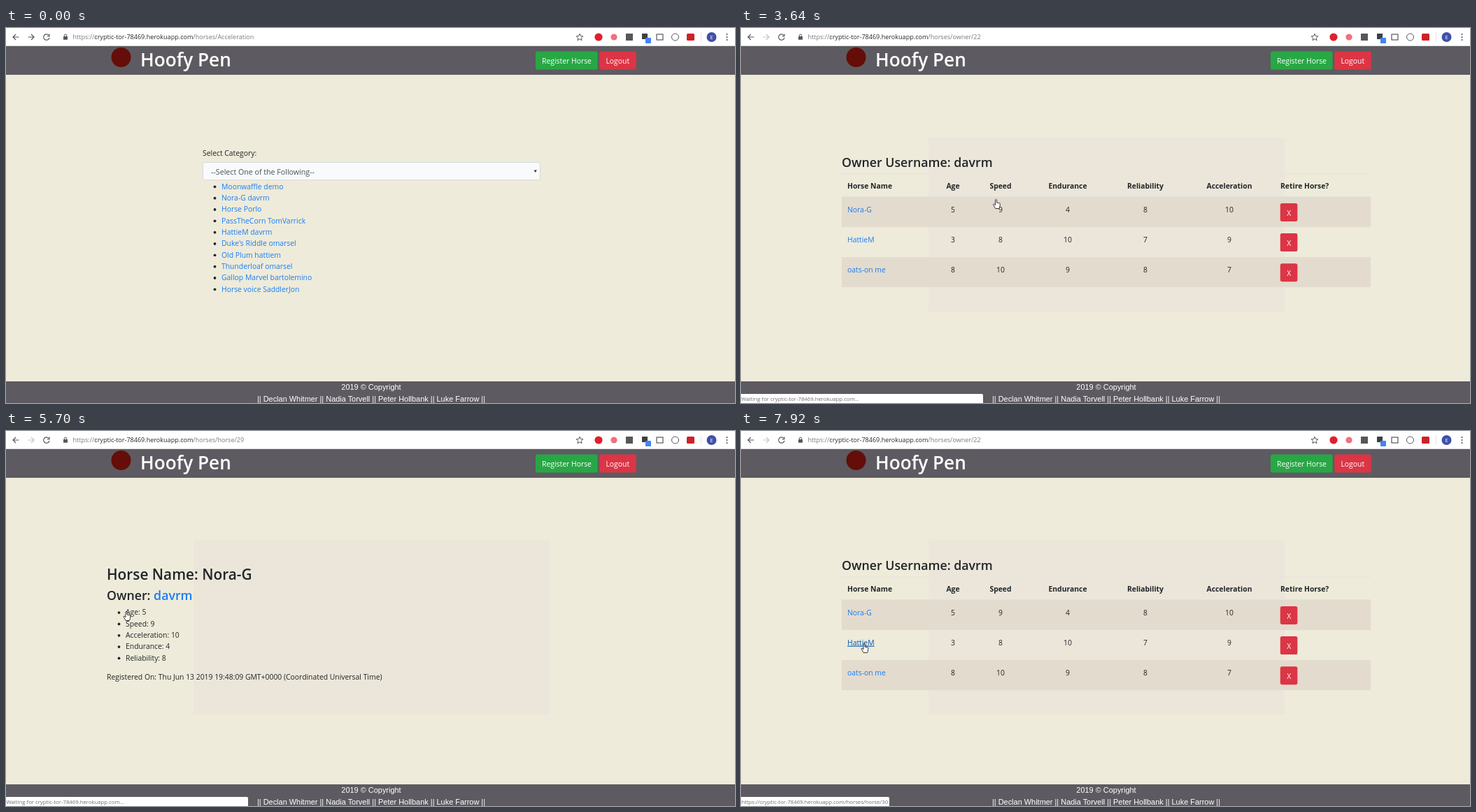
Write an HTML page that moves like this. It is 1042 px wide and 537 px high and loops after 8000 ms.

```html
<!DOCTYPE html>
<html lang="en">
<head>
<meta charset="utf-8">
<title>Horse list</title>
<style>
  html, body { margin: 0; width: 100%; height: 100%; overflow: hidden; background: #eeebda; }
  svg { display: block; }
  text { font: 10.38px "Open Sans", "Noto Sans", sans-serif; fill: #212529; white-space: pre; }
  .mid { text-anchor: middle; }
  .bold { font-weight: 700; }
  .h1 { font-size: 26.2px; font-weight: 600; fill: #fff; }
  .h2 { font-size: 20.8px; font-weight: 600; }
  .h3 { font-size: 17.75px; font-weight: 600; }
  .white { fill: #fff; }
  .field { font-size: 10.65px; fill: #495057; }
  .link { fill: #1a7df5; }
  .link.hot { fill: #0056b3; text-decoration: underline; }
  .foot { font: 10.95px "Liberation Sans", Arial, sans-serif; fill: #fff; text-anchor: middle; }
  .url { font-size: 9.05px; fill: #777a7e; }
  .url .host { fill: #26282b; }
  .status { font-size: 7.75px; fill: #6a6d70; }
  .initial { font-size: 7.5px; }
  .line { fill: none; stroke: #54575b; stroke-width: 1.2; }
  .thin { stroke-width: 1; }
</style>
</head>
<body>
<svg id="stage" width="1042" height="537" viewBox="0 0 1042 537">
  <rect width="1042" height="537" fill="#eeebda"/>

  <!-- browser toolbar -->
  <rect width="1042" height="26" fill="#fff"/>
  <rect y="25" width="1042" height="1" fill="#dcdcde"/>
  <path class="line" d="M18.5 13H10M14 9l-4 4 4 4"/>
  <path id="forward" class="line" d="M31.5 13H40M36 9l4 4-4 4"/>
  <path class="line" data-on="0-3330 3640-5460 5700-7000 7400-8000" d="M61 10.2A4.2 4.2 0 1 0 62 14M62 8.6v3h-3"/>
  <path class="line" data-on="3330-3640 5460-5700 7000-7400" d="M54.5 9.5l7 7M61.5 9.5l-7 7"/>
  <rect x="82" y="12" width="6" height="4.8" rx=".6" fill="#54575b"/>
  <path class="line thin" d="M83.3 12v-1.3a1.7 1.7 0 0 1 3.4 0V12"/>
  <g id="urls"></g>
  <path class="line thin" d="M820 8.2l1.4 3.3 3.5.3-2.7 2.4.8 3.5-3-1.9-3 1.9.8-3.5-2.7-2.4 3.5-.3z"/>
  <circle cx="847" cy="13" r="5.6" fill="#e01f2d"/>
  <circle cx="869" cy="13" r="4.6" fill="#f0707c"/>
  <rect x="886" y="8" width="10" height="10" fill="#55575a"/>
  <rect x="909" y="8" width="8" height="8" fill="#3d4043"/>
  <rect x="914" y="14" width="8" height="8" rx="1" fill="#4285f4"/>
  <rect class="line" x="930" y="9" width="9" height="8"/>
  <circle class="line thin" cx="956.5" cy="13" r="5"/>
  <rect x="973" y="8" width="11" height="10" rx="1.5" fill="#cf2026"/>
  <path d="M993.5 6v14" stroke="#e3e4e6"/>
  <circle cx="1008.5" cy="13" r="7" fill="#3f50a8"/>
  <text class="mid white initial" x="1008.5" y="15.8">E</text>
  <g fill="#54575b"><circle cx="1030.5" cy="9" r="1.1"/><circle cx="1030.5" cy="13" r="1.1"/><circle cx="1030.5" cy="17" r="1.1"/></g>

  <!-- site header and footer -->
  <rect y="26" width="1042" height="41" fill="#5d5b61"/>
  <circle cx="164.5" cy="42" r="14" fill="#650d08"/>
  <text class="h1" x="192" y="54.5">Hoofy Pen</text>
  <rect x="757" y="33.6" width="88.6" height="26" rx="2.7" fill="#28a745"/>
  <text class="mid white" x="801.5" y="51">Register Horse</text>
  <rect x="848.3" y="33.6" width="52.4" height="26" rx="2.7" fill="#dc3545"/>
  <text class="mid white" x="874.3" y="51">Logout</text>
  <rect y="506" width="1042" height="31" fill="#5d5b61"/>
  <text class="foot" x="522" y="518">2019 © Copyright</text>
  <text class="foot" x="522" y="534.5">|| Declan Whitmer || Nadia Torvell || Peter Hollbank || Luke Farrow ||</text>

  <rect data-on="3640-8000" x="268" y="157" width="509" height="249" fill="#ece6da"/>

  <!-- category page -->
  <g data-on="0-3640">
    <text x="281" y="183.3">Select Category:</text>
    <rect x="281.4" y="192.4" width="482" height="25.3" rx="2.7" fill="#f8fafb" stroke="#ced4da" stroke-width=".8"/>
    <text class="field" x="293" y="209.6">--Select One of the Following--</text>
    <path d="M754.5 203.5h4.4l-2.2 3.6z" fill="#333"/>
    <g id="horses"></g>
  </g>

  <!-- owner page -->
  <g id="owner" data-on="3640-5700 7400-8000"></g>

  <!-- horse page -->
  <g data-on="5700-7400">
    <text class="h2" x="144" y="212.8">Horse Name: Nora-G</text>
    <text class="h3" x="144" y="241.5">Owner: <tspan class="link" data-hot="6760-7400">davrm</tspan></text>
    <g id="facts"></g>
    <text x="144" y="356">Registered On: Thu Jun 13 2019 19:48:09 GMT+0000 (Coordinated Universal Time)</text>
  </g>

  <g id="statuses"></g>

  <g id="cursor" data-on="70-8000" stroke="#222" stroke-width=".9" stroke-linejoin="round">
    <path id="arrow" fill="#fff" d="M0 0v9.3l2.2-2 1.5 3.2 1.5-.7-1.5-3.1h2.9z"/>
    <path id="hand" fill="#fff" d="M-1 1Q0-.5 1 1V5l4 .8q1 .3.9 1.4l-.6 4-.9 2.3H-.8L-3.7 8.6q-.6-1.3.6-1.6L-1 8.6z"/>
    <path id="beam" fill="none" d="M-1.7-5H-.5L0-4.5.5-5h1.2M0-4.5v9M-1.7 5H-.5L0 4.5.5 5h1.2"/>
  </g>
</svg>

<script>
const LOOP = 8000, FRAME = 75;
const HOST = "cryptic-tor-78469.herokuapp.com";
const $ = id => document.getElementById(id);
const text = (x, y, body, cls = "") => `<text x="${x}" y="${y}" class="${cls}">${body}</text>`;
const link = (label, hot = "") => `<tspan class="link" data-hot="${hot}">${label}</tspan>`;
const bullets = (items, x, y) => items.map((item, i) => {
  const base = y + i * 16.34;
  return `<circle cx="${x - 9.5}" cy="${base - 3.3}" r="1.9" fill="#212529"/>` + text(x, base, item);
}).join("");

$("urls").innerHTML = [
  ["Acceleration", "0-3460"],
  ["owner/22", "3460-5620 7330-8000"],
  ["horse/29", "5620-7330"]
].map(([path, on]) => `<g data-on="${on}">` +
  text(95.5, 16.2, `https://<tspan class="host">${HOST}</tspan>/horses/${path}`, "url") + "</g>").join("");

$("horses").innerHTML = bullets([
  ["Moonwaffle", "demo"], ["Nora-G", "davrm", "1740-2140", "2290-3640"], ["Horse", "Porlo"],
  ["PassTheCorn", "TomVarrick"], ["HattieM", "davrm"], ["Duke's Riddle", "omarsel"],
  ["Old Plum", "hattiem"], ["Thunderloaf", "omarsel"], ["Gallop Marvel", "bartolemino"],
  ["Horse voice", "SaddlerJon"]
].map(([horse, user, a, b]) => link(horse, a) + " " + link(user, b)), 308, 230.6);

$("facts").innerHTML = bullets(
  ["Age: 5", "Speed: 9", "Acceleration: 10", "Endurance: 4", "Reliability: 8"], 171, 263.4);

// owner table
const columns = [303, 371, 467, 578, 698];
const heads = ["Age", "Speed", "Endurance", "Reliability", "Acceleration"];
const rows = [
  ["Nora-G", "5230-5700", [5, 9, 4, 8, 10]],
  ["HattieM", "7770-8000", [3, 8, 10, 7, 9]],
  ["oats-on me", "", [8, 10, 9, 8, 7]]
];
const cells = (values, y, cls) => values.map((v, i) => text(columns[i], y, v, "mid " + cls)).join("");
$("owner").innerHTML = text(144, 198.7, "Owner Username: davrm", "h3") +
  `<path d="M144 209h756" stroke="#e4e3dc"/>` +
  text(152, 229.9, "Horse Name", "bold") + cells(heads, 229.9, "bold") + text(771, 229.9, "Retire Horse?", "bold") +
  `<path d="M144 241.5h756" stroke="#e2e1dc"/>` +
  rows.map(([name, hot, stats], i) => {
    const y = 242 + i * 43.1;
    return (i % 2 ? "" : `<rect x="144" y="${y}" width="756" height="43" fill="#e3dbce"/>`) +
      text(152, y + 21.6, link(name, hot)) + cells(stats, y + 21.6, "") +
      `<rect x="770.8" y="${y + 9}" width="24.6" height="26" rx="2.7" fill="#dc3545"/>` +
      text(783.2, y + 26.6, "X", "mid white");
  }).join("");

$("statuses").innerHTML = [
  [215, `https://${HOST}/horses/owner/22`, "2290-3330 6830-7000"],
  [212, `https://${HOST}/horses/horse/29`, "5380-5460"],
  [212, `https://${HOST}/horses/horse/30`, "7850-8000"],
  [346, `Waiting for ${HOST}...`, "3330-3850 5460-5860 7000-7550"]
].map(([w, label, on]) => `<g data-on="${on}"><path d="M0 524H${w - 2}q2 0 2 2v11H0z" fill="#fff"/>` +
  text(.5, 533.6, label, "status") + "</g>").join("");

// pointer: time, x, y of the tip
const path = [
  [70, 828, 466], [150, 655, 363], [220, 593, 224], [300, 572, 210], [370, 488, 190], [450, 445, 208],
  [520, 438, 209], [600, 438, 209], [670, 432, 213], [740, 422, 219], [890, 411, 222], [1300, 411, 222],
  [1450, 393, 228], [1520, 380, 231], [1670, 345, 249], [1900, 343, 251], [2140, 352, 250],
  [2220, 352, 250], [2290, 363, 248], [2370, 364.5, 248], [2700, 364.5, 248], [2830, 358, 241],
  [3130, 364.5, 245], [3780, 364.5, 245], [4100, 480, 285], [4620, 652, 320], [4690, 690, 320],
  [4850, 420, 302], [5000, 214, 279], [5230, 172, 258], [5780, 172, 258], [6080, 134, 222],
  [6160, 125, 192], [6300, 114, 153], [6400, 114, 153], [6610, 198, 245], [6760, 232, 236],
  [7300, 232, 236], [7550, 188, 296], [7920, 176, 304]
];

// Moves in whole steps, as a screen recorder samples them.
function pointerAt(t) {
  const i = path.findIndex(p => p[0] > t);
  if (i < 0) return path[path.length - 1].slice(1);
  if (i === 0) return path[0].slice(1);
  const [t0, x0, y0] = path[i - 1], [t1, x1, y1] = path[i];
  const n = Math.max(1, Math.round((t1 - t0) / FRAME));
  const k = Math.floor((t - t0) / (t1 - t0) * n) / n;
  return [x0 + (x1 - x0) * k, y0 + (y1 - y0) * k];
}

const parse = s => s.split(" ").filter(Boolean).map(r => r.split("-").map(Number));
const during = (ranges, t) => ranges.some(([a, b]) => t >= a && t < b);
const collect = key => [...document.querySelectorAll(`[data-${key}]`)].map(el => [el, parse(el.dataset[key])]);
const timed = collect("on"), hot = collect("hot");
const handTimes = parse("1590-3850 5230-5860 6760-7400 7770-8000");
const beamTimes = parse("6540-6760");

function draw(now) {
  const t = now % LOOP;
  for (const [el, ranges] of timed) el.style.display = during(ranges, t) ? "" : "none";
  for (const [el, ranges] of hot) el.classList.toggle("hot", during(ranges, t));
  $("forward").style.opacity = t < 3460 ? 1 : .35;
  const shape = during(handTimes, t) ? "hand" : during(beamTimes, t) ? "beam" : "arrow";
  for (const id of ["arrow", "hand", "beam"]) $(id).style.display = id === shape ? "" : "none";
  $("cursor").setAttribute("transform", `translate(${pointerAt(t)})`);
}

const start = performance.now();
function tick() {
  draw(performance.now() - start);
  requestAnimationFrame(tick);
}
tick();
</script>
</body>
</html>
```
